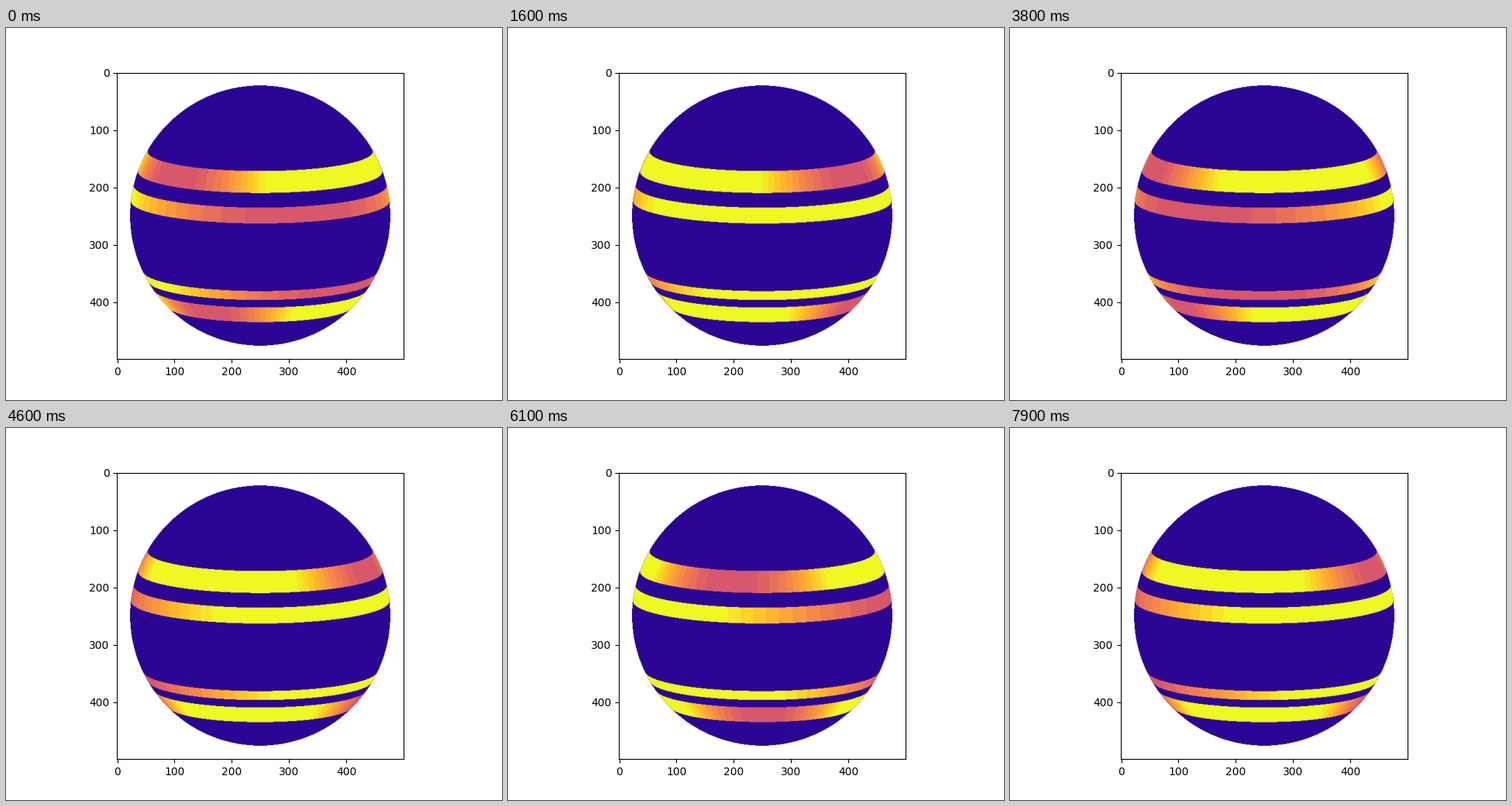
A matplotlib script for the animation above (8 s loop, 640x480 px).

```python
import numpy as np
import matplotlib.pyplot as plt
from matplotlib.animation import FuncAnimation

FRAMES = 80
INTERVAL = 100            # ms
SIZE = 500                # samples per side
TILT = np.radians(10)     # north pole leans towards the viewer
DRIFT = 10.8              # wave phase per step, degrees
BASE, LOW = 0.052, 0.556  # colour-map positions of the surface and the darkest band
STEPS = 11                # colour steps from LOW up to full brightness

# centre latitude, half width, wave number, longitude of the first minimum (degrees)
BANDS = [
    (25, 5, 2, -45.5),
    (10, 3.5, 1, 19),
    (-28, 2.5, 1, 46),
    (-40, 5, 2, -30),
]


def globe_coords():
    """Latitude and longitude in degrees seen at each pixel, NaN off the disc."""
    axis = np.linspace(-1.1, 1.1, SIZE)
    x, y = np.meshgrid(axis, -axis)
    r2 = x**2 + y**2
    z = np.sqrt(np.where(r2 <= 1, 1 - r2, np.nan))
    lat = np.arcsin(np.clip(y * np.cos(TILT) + z * np.sin(TILT), -1, 1))
    lon = np.arctan2(x, z * np.cos(TILT) - y * np.sin(TILT))
    return np.degrees(lat), np.degrees(lon)


lat, lon = globe_coords()
surface = np.where(np.isnan(lat), np.nan, BASE)
masks = [np.abs(lat - centre) <= half for centre, half, _, _ in BANDS]


def render(step):
    img = surface.copy()
    for mask, (_, _, k, lon0) in zip(masks, BANDS):
        phase = np.radians(k * (lon[mask] - lon0) + DRIFT * step)
        level = np.minimum(np.floor(10 * (1 - np.cos(phase))), STEPS)
        img[mask] = LOW + (1 - LOW) * level / STEPS
    return img


fig, ax = plt.subplots(figsize=(6.4, 4.8), dpi=100)
image = ax.imshow(render(0), cmap="plasma", vmin=0, vmax=1,
                  interpolation="hanning", interpolation_stage="rgba")


def update(step):
    image.set_data(render(step))
    return [image]


anim = FuncAnimation(fig, update, frames=FRAMES, interval=INTERVAL,
                     repeat=True, repeat_delay=0)
plt.show()
```
